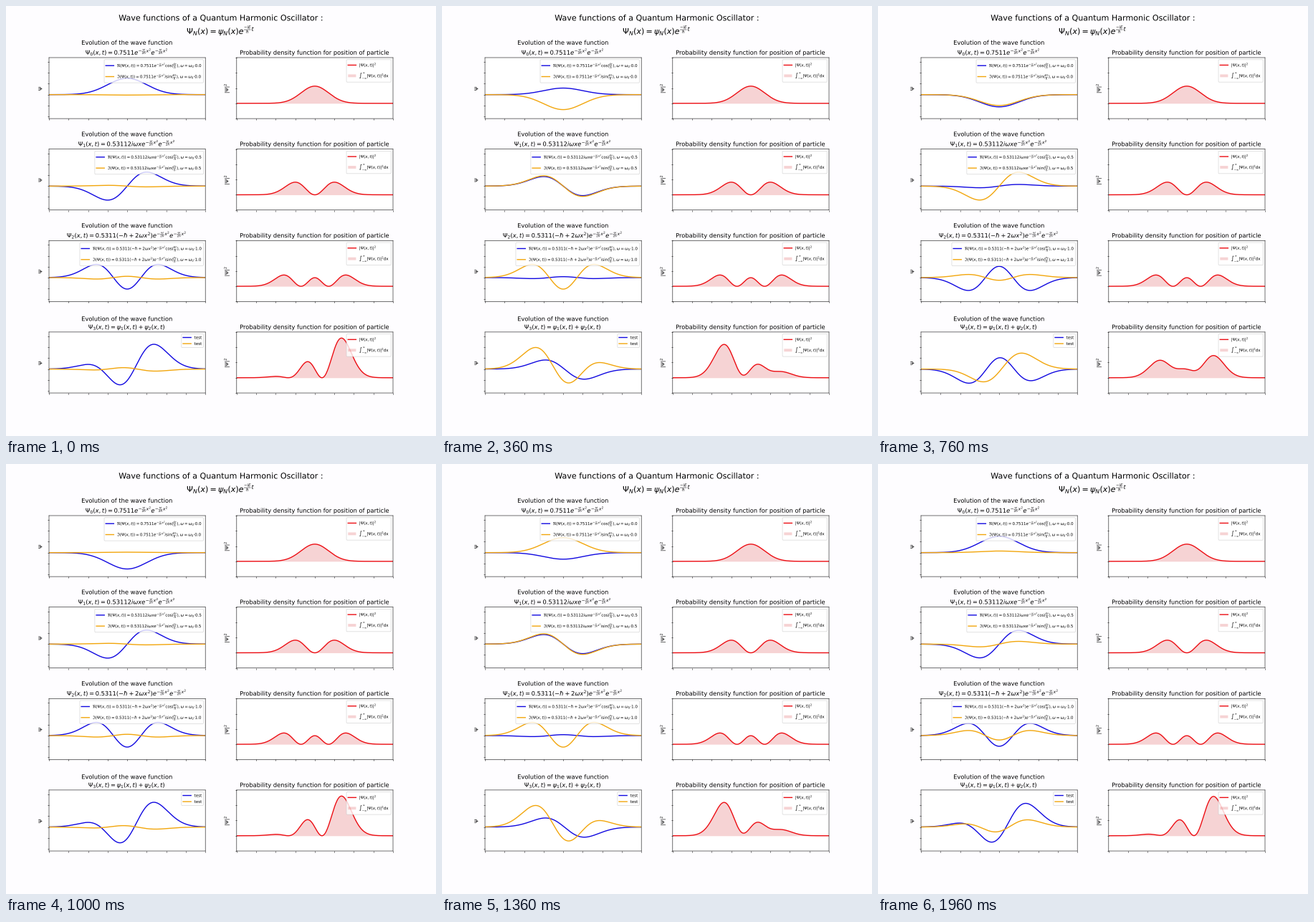
A matplotlib script for the animation above (2 s loop, 600 px wide and 600 px high).

```python
import numpy as np
import matplotlib.pyplot as plt
from matplotlib.animation import FuncAnimation
from matplotlib.patheffects import Normal
from matplotlib.text import Text

# Keep sub-pixel positions for lines and glyphs.
plt.rcParams.update({"path.snap": False, "text.hinting": "none",
                     "lines.linewidth": 2})

FRAMES = 50
BLUE, ORANGE, RED = "#1008e0", "#f2a60c", "#ec0c12"

x = np.linspace(-4, 4, 400)
gauss = np.pi ** -0.25 * np.exp(-x**2 / 2)
states = [gauss,
          np.sqrt(2) * x * gauss,
          (2 * x**2 - 1) * gauss / np.sqrt(2)]

DECAY = r"e^{-\frac{\omega}{2\hbar}x^2}"
COEFFS = ["0.7511", r"0.53112i\omega x", r"0.5311(-\hbar+2\omega x^2)"]


def waves(k):
    """Complex wave functions at step k: three states and a superposition."""
    phase = 2 * np.pi * (k + 0.22) / FRAMES
    psi = [s * np.exp(-1j * 2**n * phase) for n, s in enumerate(states)]
    return psi + [psi[1] + psi[2]]


def formula(n):
    if n == 3:
        return r"$\Psi_3(x,t)=\psi_1(x,t)+\psi_2(x,t)$"
    return rf"$\Psi_{n}(x,t)={COEFFS[n]}{DECAY}{DECAY}$"


def label(n, part, func):
    if n == 3:
        return "test"
    return (rf"${part}(\Psi(x,t))={COEFFS[n]}{DECAY}{func}(\frac{{Et}}{{\hbar}}),"
            rf"\omega=\omega_0·{n / 2}$")


def style(ax, title, ylabel, ylim):
    ax.set(xlim=(-4, 4), ylim=ylim, ylabel=ylabel)
    ax.set_title(title)
    ax.set_xticklabels([])
    ax.set_yticklabels([])
    ax.legend(loc="upper right", fontsize=8)


def area(y):
    return [np.column_stack([np.r_[x, x[::-1]], np.r_[y, 0 * y]])]


fig, axes = plt.subplots(4, 2, figsize=(12, 12), dpi=50, facecolor="#fefdff")
fig.subplots_adjust(left=0.1, right=0.9, bottom=0.1, top=0.88,
                    wspace=0.2, hspace=0.5)
fig.suptitle("Wave functions of a Quantum Harmonic Oscillator :\n"
             r"$\Psi_N(x)=\psi_N(x)e^{\frac{-iE}{\hbar}t}$", fontsize=16)

rows = []
for n, (left, right) in enumerate(axes):
    psi = waves(0)[n]
    density = abs(psi)**2
    re, = left.plot(x, psi.real, color=BLUE, label=label(n, r"\Re", r"\cos"))
    im, = left.plot(x, psi.imag, color=ORANGE, label=label(n, r"\Im", r"i\sin"))
    style(left, "Evolution of the wave function\n" + formula(n),
          r"$\Psi$", (-1.1, 1.7))

    prob, = right.plot(x, density, color=RED, label=r"$|\Psi(x,t)|^2$")
    fill = right.fill_between(x, density, color="tab:red", alpha=0.2, lw=0,
                              label=r"$\int_{-\infty}^{\infty}|\Psi(x,t)|^2$dx")
    style(right, "Probability density function for position of particle",
          r"$|\Psi|^2$", (-0.5, 1.5))
    rows.append((re, im, prob, fill))

# A path effect makes text draw as outlines, free of the pixel grid.
for text in fig.findobj(Text):
    text.set_path_effects([Normal()])


def update(k):
    for psi, (re, im, prob, fill) in zip(waves(k), rows):
        density = abs(psi)**2
        re.set_ydata(psi.real)
        im.set_ydata(psi.imag)
        prob.set_ydata(density)
        fill.set_verts(area(density))
    return [artist for row in rows for artist in row]


anim = FuncAnimation(fig, update, frames=FRAMES, interval=40, repeat=True,
                     repeat_delay=0)
plt.show()
```
